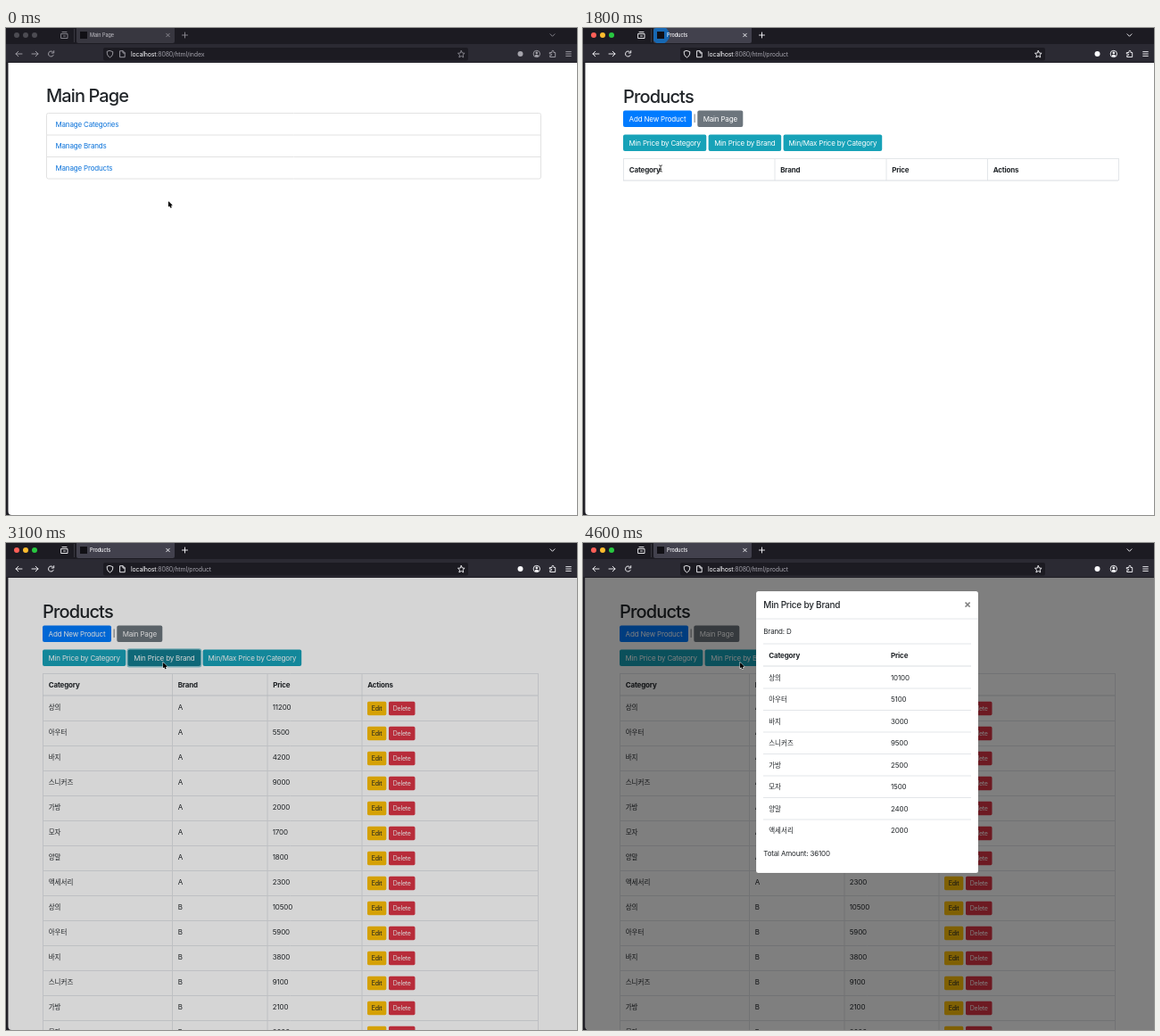
Recreate the animation shown at these times as an HTML page with a canvas. Size 640 px wide and 546 px high, loop 4.7 s.

```html
<!DOCTYPE html>
<html lang="en">
<head>
<meta charset="utf-8">
<title>Product manager</title>
<style>
  html, body { margin: 0; width: 100%; height: 100%; overflow: hidden; background: #fff; }
  canvas { display: block; width: 640px; height: 546px; }
</style>
</head>
<body>
<canvas id="stage" width="640" height="546"></canvas>
<script>
const ctx = document.getElementById('stage').getContext('2d');
const LOOP = 4700, STEP = 100;
const INK = '#212529', RULE = '#e3e6e9';
const CATEGORIES = ['상의', '아우터', '바지', '스니커즈', '가방', '모자', '양말', '액세서리'];
const PRICES = [11200, 5500, 4200, 9000, 2000, 1700, 1800, 2300, 10500, 5900, 3800, 9100, 2100, 2000];
const BRAND_PRICES = [10100, 5100, 3000, 9500, 2500, 1500, 2400, 2000];

const clamp = v => Math.max(0, Math.min(1, v));
const lerp = (a, b, p) => a + (b - a) * p;
const smooth = p => p * p * (3 - 2 * p);

// CSS ease-out, cubic-bezier(0, 0, .58, 1)
function easeOut(x) {
  let lo = 0, hi = 1;
  for (let i = 0; i < 20; i++) {
    const s = (lo + hi) / 2;
    if (1.74 * (1 - s) * s * s + s ** 3 < x) lo = s; else hi = s;
  }
  return 3 * (1 - lo) * lo * lo + lo ** 3;
}

function text(str, x, y, { size = 8, weight = 400, color = INK, align = 'left', spacing = -0.18 } = {}) {
  ctx.font = `${weight} ${size}px Inter, "Noto Sans", sans-serif`;
  ctx.letterSpacing = spacing + 'px';
  ctx.textAlign = align;
  ctx.fillStyle = color;
  ctx.fillText(str, x, y + size * 0.36);
  return ctx.measureText(str).width;
}

function korean(str, x, y) {
  ctx.font = '400 7.5px "Noto Sans CJK KR", "Noto Sans CJK", sans-serif';
  ctx.letterSpacing = '0px';
  ctx.textAlign = 'left';
  ctx.fillStyle = INK;
  ctx.fillText(str, x, y + 2.8);
}

function box(x, y, w, h, r, fill, stroke, width = 1) {
  ctx.beginPath();
  ctx.roundRect(x, y, w, h, r);
  if (fill) { ctx.fillStyle = fill; ctx.fill(); }
  if (stroke) { ctx.strokeStyle = stroke; ctx.lineWidth = width; ctx.stroke(); }
}

function line(points, color, width = 1) {
  ctx.beginPath();
  points.forEach(([x, y], i) => i ? ctx.lineTo(x, y) : ctx.moveTo(x, y));
  ctx.strokeStyle = color;
  ctx.lineWidth = width;
  ctx.stroke();
}

const hline = (x1, x2, y, color = RULE, width = 1) => line([[x1, y], [x2, y]], color, width);

function circle(x, y, r, fill, stroke, from = 0, to = Math.PI * 2) {
  ctx.beginPath();
  ctx.arc(x, y, r, from, to);
  if (fill) { ctx.fillStyle = fill; ctx.fill(); }
  if (stroke) { ctx.strokeStyle = stroke; ctx.lineWidth = 0.9; ctx.stroke(); }
}

function icon(d, x, y, color, fill) {
  const path = new Path2D(d);
  ctx.save();
  ctx.translate(x, y);
  ctx.lineWidth = 0.9;
  ctx.lineJoin = ctx.lineCap = 'round';
  if (fill) { ctx.fillStyle = fill; ctx.fill(path); }
  ctx.strokeStyle = color;
  ctx.stroke(path);
  ctx.restore();
}

function button(label, x, y, w, fill, color = '#fff') {
  box(x, y, w, 18.6, 2, fill);
  text(label, x + w / 2, y + 9.3, { color, align: 'center' });
}

function drawChrome(t) {
  const active = t >= 700;
  const fg = active ? '#fbfbfe' : '#8f8e96';
  const nav = active ? '#fbfbfe' : '#a5a4ac';
  ctx.fillStyle = '#1c1b22';
  ctx.fillRect(0, 0, 640, 18);
  ctx.fillStyle = '#2b2a33';
  ctx.fillRect(0, 18, 640, 21);
  ctx.fillStyle = '#18171d';
  ctx.fillRect(0, 38.4, 640, 0.6);

  ['#ff5f57', '#febc2e', '#28c840'].forEach((c, i) =>
    circle(12 + i * 10, 8, 3, active ? c : '#4c4b52'));
  icon('M-3.5-1.5H3.5V3.5H-3.5ZM-2.5-3.5H2.5M-1 1H1', 65.5, 8, fg);
  line([[76.5, 1], [76.5, 16]], '#38373f');

  box(79, 0, 110, 17, [0, 0, 2, 2], active ? '#42414d' : '#383740');
  if (t >= 1700 && t < 2100) {
    ctx.save();
    ctx.beginPath();
    ctx.rect(79, 0, 110, 17);
    ctx.clip();
    ctx.globalAlpha = 1 - clamp((t - 1800) / 300);
    circle(87, 8, t < 1800 ? 6 : 10, '#1768b3');
    ctx.restore();
  }
  ctx.fillStyle = '#111015';
  ctx.fillRect(83, 4, 8, 8);
  text(t < 1700 ? 'Main Page' : 'Products', 94, 8.3,
    { size: 5.5, weight: active ? 500 : 400, color: active ? '#fbfbfe' : '#c3c2c8', spacing: -0.04 });
  icon('M-1.8-1.8L1.8 1.8M1.8-1.8L-1.8 1.8', 181.5, 8, fg);
  icon('M-3 0H3M0-3V3', 200.5, 8, fg);
  icon('M-2.5-1.2L0 1.3L2.5-1.2', 612.5, 8, fg);

  icon('M3.5 0H-3.5M-.7-2.8L-3.5 0L-.7 2.8', 14.5, 29, nav);
  icon('M-3.5 0H3.5M.7-2.8L3.5 0L.7 2.8', 32.5, 29, nav);
  circle(50.5, 29, 3, null, nav, 0.3, 5.6);
  icon('M3.2-3.4V-1H.8', 50.5, 29, nav);

  box(109, 22, 409, 14.5, 2, '#1c1b22');
  icon('M0-3.7L3.3-2.5C3.4 1 2 2.8 0 3.8C-2 2.8-3.4 1-3.3-2.5Z', 116.5, 29.2, nav);
  icon('M-2.5-3.5H.6L2.7-1.4V3.5H-2.5ZM.5-3.3V-1.2H2.6', 130.5, 29.2, nav);
  const hostWidth = text('localhost', 140, 29.3, { size: 7, color: '#fbfbfe', spacing: -0.17 });
  text(':8080/html/' + (t < 1700 ? 'index' : 'product'), 140 + hostWidth, 29.3,
    { size: 7, color: '#a09fa8', spacing: -0.17 });
  icon('M0-3.8L1.1-1.3L3.8-1L1.8 .8L2.4 3.6L0 2.2L-2.4 3.6L-1.8 .8L-3.8-1L-1.1-1.3Z', 510.3, 29.3, fg);

  circle(576.5, 29, 3, nav);
  circle(594.8, 29, 3.7, null, nav);
  circle(594.8, 27.9, 1.3, nav);
  circle(594.8, 32, 2.2, nav, null, Math.PI, Math.PI * 2);
  icon('M-3-1.5H-.8V-2.7A1 1 0 0 1 1.2-2.7V-1.5H3V3.5H-3V1.8H-2A.9 .9 0 0 0-2 0H-3Z', 612.7, 29, nav);
  icon('M-2.8-2.4H2.8M-2.8 0H2.8M-2.8 2.4H2.8', 630.5, 29, nav);
}

function drawMainPage(hover) {
  text('Main Page', 45, 76, { size: 20, weight: 500, spacing: -0.92 });
  box(45.5, 95.5, 554, 73.5, 2, null, '#e2e2e2');
  hline(46, 599, 120, '#e2e2e2');
  hline(46, 599, 144.5, '#e2e2e2');
  ['Categories', 'Brands', 'Products'].forEach((name, i) => {
    const on = hover && i === 2, y = 107.7 + i * 24.5;
    const color = on ? '#0056b3' : '#0a72da';
    const w = text('Manage ' + name, 55.5, y, { color });
    if (on) hline(55.5, 55.5 + w, 160.5, color, 0.8);
  });
}

function drawProducts(loaded, brandState) {
  const x = loaded ? 41 : 45;
  const cols = loaded ? [41, 186, 292.5, 398.5, 596] : [45, 214.5, 339.5, 453, 600];
  text('Products', x, 77, { size: 20, weight: 500, spacing: -0.85 });
  button('Add New Product', x, 92.5, 77, '#007bff');
  text('|', x + 80, 101.5, { align: 'center' });
  button('Main Page', x + 83.3, 92.5, 51, '#6c757d');
  button('Min Price by Category', x, 119.5, 93.3, '#17a2b8');
  if (brandState === 'focus') box(x + 94.4, 118.2, 84, 21.2, 3, '#8fcbd6');
  button('Min Price by Brand', x + 95.6, 119.5, 81.6,
    { focus: '#127d8f', hover: '#138496' }[brandState] || '#17a2b8');
  button('Min/Max Price by Category', x + 179.6, 119.5, 110.6, '#17a2b8');

  const bottom = loaded ? 560 : 171;
  hline(cols[0], cols[4], 146.5);
  cols.forEach(c => line([[c + 0.5, 146], [c + 0.5, bottom]], RULE));
  hline(cols[0], cols[4], 171, '#dadee2', 1.2);
  ['Category', 'Brand', 'Price', 'Actions'].forEach((name, i) =>
    text(name, cols[i] + 6.7, 159, { weight: 700 }));
  if (!loaded) return;

  PRICES.forEach((price, i) => {
    const y = 184 + i * 28;
    korean(CATEGORIES[i % 8], cols[0] + 6.7, y);
    text('AB'[Math.floor(i / 8)], cols[1] + 6.7, y);
    text(String(price), cols[2] + 6.3, y);
    box(405, y - 6.2, 21.3, 15.4, 1.6, '#ffc107');
    text('Edit', 415.6, y + 1.6, { size: 7, align: 'center' });
    box(429, y - 6.2, 29.5, 15.4, 1.6, '#dc3545');
    text('Delete', 443.7, y + 1.6, { size: 7, align: 'center', color: '#fff' });
    hline(cols[0], cols[4], y + 15.5);
  });
}

function drawModal(offset, opacity) {
  ctx.save();
  ctx.globalAlpha = opacity;
  ctx.translate(0, offset);
  box(194, 54, 249, 316, 2.5, '#fff', 'rgba(0,0,0,.2)', 0.5);
  text('Min Price by Brand', 202.3, 69.3, { size: 10, weight: 500, spacing: -0.24 });
  text('×', 431, 68.8, { size: 12, weight: 700, color: '#7f7f7f', align: 'center', spacing: 0 });
  hline(194, 443, 85);
  text('Brand: D', 202.3, 99.5);
  hline(202, 435, 113);
  text('Category', 208.2, 126, { weight: 700 });
  text('Price', 345, 126, { weight: 700 });
  hline(202, 435, 138, '#dadee2', 1.2);
  BRAND_PRICES.forEach((price, i) => {
    const y = 151 + i * 24.5;
    korean(CATEGORIES[i], 208.2, y);
    text(String(price), 345, y);
    if (i < 7) hline(202, 435, y + 12);
  });
  text('Total Amount: 36100', 202.3, 348.5);
  ctx.restore();
}

function drawCursor(t) {
  if (t >= 700 && t < 1700) {
    icon('M-1.6-4.2Q-.6-5 0-4V-1.2L3-.6Q4 0 3.6 1.6L2.8 4H-1.2L-3.8 .8Q-3.6-.4-2.4 .2L-1.6 .8Z', 88.2, 161.3, '#222', '#fff');
  } else if (t >= 1700 && t < 2100) {
    icon('M-1.5-3.6Q0-3.6 0-2.6Q0-3.6 1.5-3.6M0-2.6V2.6M-1.5 3.6Q0 3.6 0 2.6Q0 3.6 1.5 3.6M-.8 .8H.8', 87, 157.5, '#333');
  } else {
    let x, y;
    if (t < 700) {
      const p = smooth(clamp(t / 600));
      x = lerp(182, 87, p);
      y = lerp(194.3, 157, p);
    } else {
      const p = smooth(clamp((t - 2000) / 600));
      x = lerp(87, 176, p);
      y = lerp(157, 134, p);
    }
    icon('M0 0V6.6L1.5 5.3L2.5 7.6L3.7 7.1L2.7 4.9H4.7Z', x, y, '#fff', '#000');
    icon('M.4 1V5.6L1.6 4.6L2.7 7L3.2 6.8L2.1 4.4H3.8Z', x, y, '#000', '#000');
  }
}

function drawPage(t) {
  ctx.save();
  ctx.beginPath();
  ctx.roundRect(2.5, 39, 645, 507, [0, 0, 0, 4]);
  ctx.clip();
  ctx.fillStyle = '#fff';
  ctx.fillRect(0, 39, 640, 507);
  if (t < 1700) {
    drawMainPage(t >= 700);
    if (t >= 900) {
      box(2, 538, 80, 10, [0, 2, 0, 0], '#55545c');
      text('localhost:8080/html/product', 4, 542.7, { size: 6, color: '#f4f4f6', spacing: -0.2 });
    }
  } else {
    const brandState = t >= 3600 ? '' : t >= 2900 ? 'focus' : t >= 2500 ? 'hover' : '';
    const loaded = t >= 1900;
    drawProducts(loaded, brandState);
    if (loaded && t < 3100) {
      ctx.fillStyle = '#fafafa';
      ctx.fillRect(636, 39, 4, 507);
      box(637, 40, 3, 113, 1.5, '#c1c1c1');
    }
    const shade = 0.5 * clamp((t - 3050) / 150);
    ctx.fillStyle = `rgba(0,0,0,${shade})`;
    ctx.fillRect(0, 39, 640, 507);
    if (t >= 3200) drawModal(-25 * (1 - easeOut(clamp((t - 3180) / 280))), clamp((t - 3165) / 150));
  }
  ctx.restore();
}

function draw(now) {
  const t = Math.floor(now % LOOP / STEP) * STEP;
  ctx.fillStyle = '#1f1e25';
  ctx.fillRect(0, 0, 640, 546);
  drawPage(t);
  drawChrome(t);
  drawCursor(t);
}

let start;
function tick(now) {
  start ??= now;
  draw(now - start);
  requestAnimationFrame(tick);
}
draw(0);
requestAnimationFrame(tick);
</script>
</body>
</html>
```
